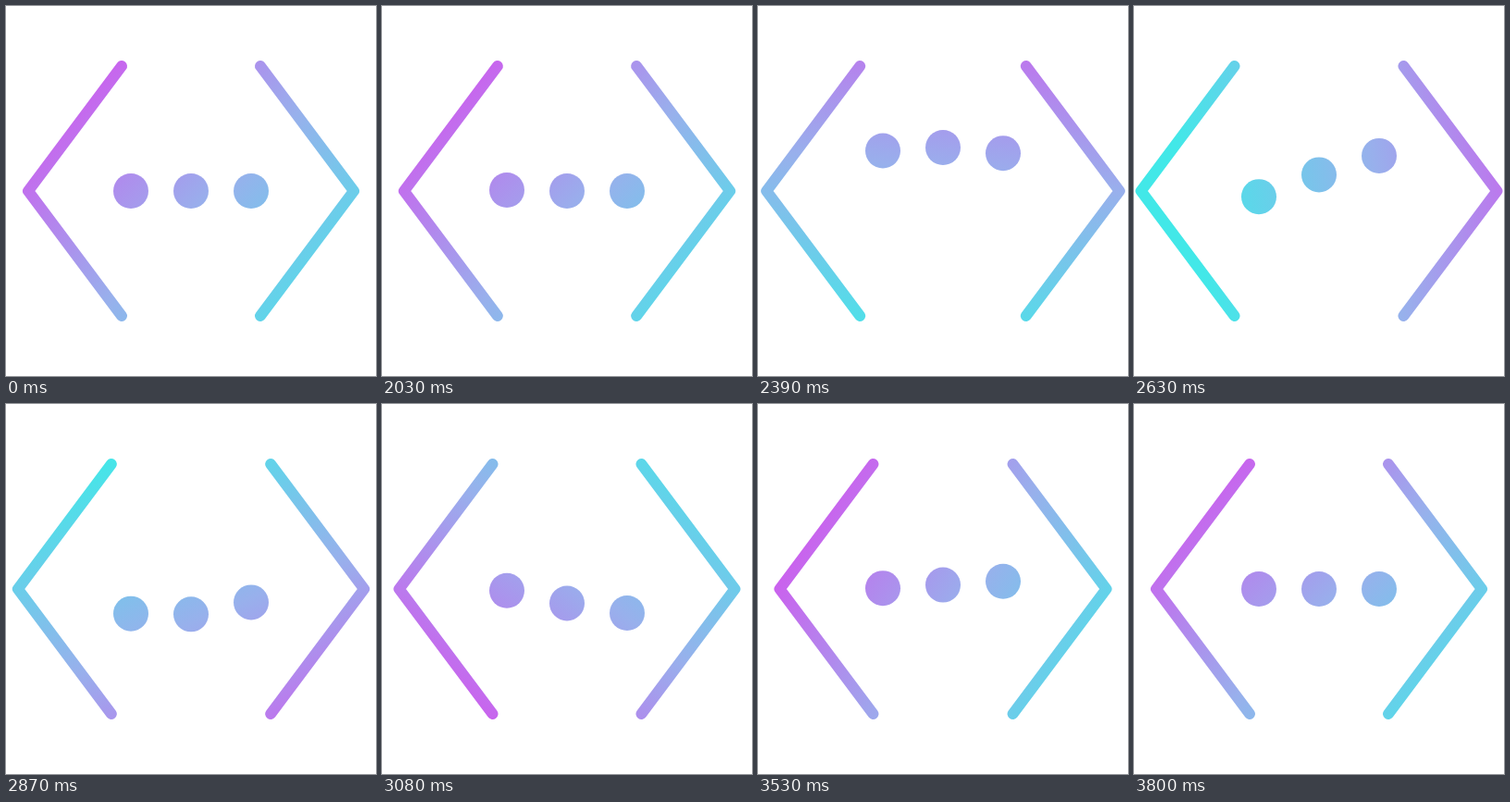
An HTML page that plays this animation: 400 px wide and 400 px high, repeating every 3.83 s.

```html
<!DOCTYPE html>
<html lang="en">
<head>
<meta charset="utf-8">
<title>Code loader</title>
<style>
  html, body { margin: 0; width: 100%; height: 100%; overflow: hidden; background: #fff; }
  svg { display: block; width: 100%; height: 100%; }
</style>
</head>
<body>
<svg viewBox="0 0 400 400">
  <defs>
    <linearGradient id="tint" gradientUnits="userSpaceOnUse" x1="15" y1="200" x2="440" y2="200">
      <stop offset="0" stop-color="#d452ee"/>
      <stop offset=".518" stop-color="#98b0ec"/>
      <stop offset="1" stop-color="#42e8e8"/>
    </linearGradient>
  </defs>
  <g fill="none" stroke="url(#tint)" stroke-width="12" stroke-linecap="round" stroke-linejoin="round">
    <path id="left"/>
    <path id="right"/>
  </g>
  <g id="dots" fill="url(#tint)">
    <circle cx="135" cy="200" r="19"/>
    <circle cx="200" cy="200" r="19"/>
    <circle cx="265" cy="200" r="19"/>
  </g>
</svg>
<script>
const LOOP = 3830, START = 2020, LENGTH = 1780, STAGGER = 100;
const PIVOT = '250 200';

const byId = id => document.getElementById(id);
const tint = byId('tint'), left = byId('left'), right = byId('right');
const dots = [...byId('dots').children];

const clamp = x => Math.min(1, Math.max(0, x));

function bezier(x1, y1, x2, y2) {
  const at = (a, b, s) => 3 * a * s * (1 - s) ** 2 + 3 * b * s * s * (1 - s) + s ** 3;
  return x => {
    if (x <= 0 || x >= 1) return clamp(x);
    let lo = 0, hi = 1;
    for (let i = 0; i < 24; i++) {
      const mid = (lo + hi) / 2;
      if (at(x1, x2, mid) < x) lo = mid; else hi = mid;
    }
    return at(y1, y2, lo);
  };
}

const ease = bezier(.25, .1, .25, 1);
const turn = bezier(.3, 0, .54, 1);
const sine = x => (1 - Math.cos(Math.PI * x)) / 2;

// Keys are [time, value, easing into this key].
function track(keys, t) {
  let [from, value] = keys[0];
  for (const [to, next, easing] of keys) {
    if (t < to) return value + (next - value) * easing(clamp((t - from) / (to - from)));
    from = to;
    value = next;
  }
  return value;
}

const spread = [[0, 0, ease], [600, 16.5, ease], [LENGTH, 0, ease]];
const bounce = [[0, 0, ease], [300, -47.3, ease], [790, 28.5, sine], [1220, -9.7, sine], [1580, 0, sine]];

function draw(time) {
  const t = Math.max(0, time - START);
  const gap = track(spread, t);
  const angle = 45 + 360 * turn(t / LENGTH);
  tint.setAttribute('gradientTransform', `rotate(${angle} ${PIVOT})`);
  left.setAttribute('d', `M${125 - gap} 65L${24 - gap} 200L${125 - gap} 335`);
  right.setAttribute('d', `M${275 + gap} 65L${376 + gap} 200L${275 + gap} 335`);
  dots.forEach((dot, i) => {
    dot.setAttribute('cy', 200 + track(bounce, Math.max(0, t - i * STAGGER)));
  });
}

const origin = performance.now();
function tick() {
  draw((performance.now() - origin) % LOOP);
  requestAnimationFrame(tick);
}
tick();
</script>
</body>
</html>
```
